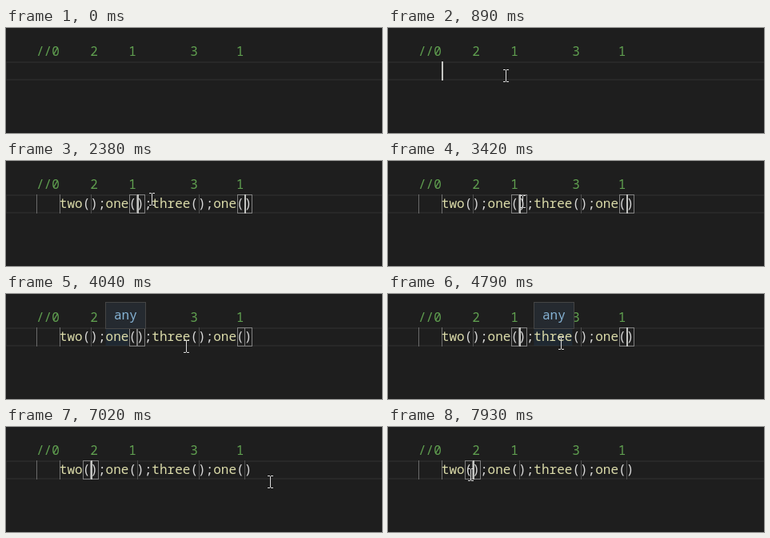
Recreate the animation shown at these times as an HTML page with a canvas. Size 470 px wide and 132 px high, loop 8 s.

```html
<!DOCTYPE html>
<html lang="en">
<head>
<meta charset="utf-8">
<title>Snippet placeholders</title>
<style>
html, body { margin: 0; width: 470px; height: 132px; overflow: hidden; background: #1e1e1e; }
canvas { display: block; width: 470px; height: 132px; }
</style>
</head>
<body>
<canvas id="stage"></canvas>
<script>
const W = 470, H = 132, LOOP = 8000;
const LEFT = 38, CHAR = 9.62, TOP = 42, ROW = 24, INDENT = 3;
const BLINK = 500, HOVER_DELAY = 480;
const FAMILY = '"Noto Sans Mono", "DejaVu Sans Mono", monospace';
const CODE = 'two();one();three();one()';
const LABELS = ['tts', 'TextTrack', 'TextTrackCue', 'TextTrackList', 'TextTrackCueList'];

// Each edit restarts the caret blink; `at` names the calls whose brackets are active
const EDITS = [
  { time: -BLINK, text: '' },
  { time: 1440, text: 't' },
  { time: 1500, text: 'tt', labels: LABELS.slice(0, 3) },
  { time: 1700, text: 'tts', labels: [LABELS[0], ...LABELS.slice(3)] },
  { time: 2380, text: CODE, at: 'one' },
  { time: 6880, text: CODE, at: 'two' }
];

// Pointer glides: start, end, target x, target y
const ENTRY = [284, 97];
const GLIDES = [
  [70, 350, 134, 64], [750, 1170, 182, 48], [3210, 3740, 141, 58], [3740, 3970, 225, 66],
  [4040, 4590, 216, 62], [4790, 5410, 371, 98], [6080, 6420, 338, 90],
  [6620, 7020, 330, 69], [7020, 7370, 160, 70], [7440, 7930, 103, 60]
];

const canvas = document.getElementById('stage');
const dpr = window.devicePixelRatio || 1;
canvas.width = W * dpr;
canvas.height = H * dpr;
const ctx = canvas.getContext('2d');
ctx.scale(dpr, dpr);

const colX = col => LEFT + col * CHAR;
const edge = col => Math.ceil(colX(col));
const ease = p => p * p * (3 - 2 * p);

function rect(x, y, w, h, color) {
  ctx.fillStyle = color;
  ctx.fillRect(x, y, w, h);
}

function frame(x, y, w, h, color) {
  ctx.strokeStyle = color;
  ctx.lineWidth = 1;
  ctx.strokeRect(x + .5, y + .5, w - 1, h - 1);
}

function text(s, x, y, color, weight = 500) {
  ctx.font = `${weight} 16.03px ${FAMILY}`;
  ctx.fillStyle = color;
  ctx.fillText(s, x, y);
}

// Columns just after each "name(" in the code
function slots(name) {
  return [...CODE.matchAll(new RegExp(`${name}\\(`, 'g'))]
    .map(m => INDENT + m.index + m[0].length);
}

function pointerAt(t) {
  let pos = ENTRY;
  for (const [a, b, ...goal] of GLIDES) {
    if (t < a) break;
    const p = ease(Math.min(1, (t - a) / (b - a)));
    pos = pos.map((v, i) => v + (goal[i] - v) * p);
  }
  return pos.map(Math.round);
}

function wordAt(line, [x, y]) {
  if (y < TOP || y > TOP + ROW) return null;
  const col = (x - LEFT) / CHAR - INDENT;
  return [...line.matchAll(/\w+/g)].find(m => col >= m.index && col < m.index + m[0].length);
}

// Matched letters, capitals first
function matches(label, query) {
  let from = 0;
  return [...query].map(ch => {
    const upper = label.indexOf(ch.toUpperCase(), from);
    const hit = upper < 0 ? label.indexOf(ch, from) : upper;
    from = hit + 1;
    return hit;
  });
}

function drawPointer([x, y]) {
  const c = '#dcdcdc';
  rect(x, y - 7, 1, 14, c);
  for (const e of [y - 8, y + 7]) {
    rect(x - 3, e, 3, 1, c);
    rect(x + 1, e, 3, 1, c);
  }
}

function drawLine() {
  for (const y of [TOP, TOP + ROW - 2]) rect(0, y, W, 2, '#282828');
  rect(0, TOP, 1, ROW, '#282828');
}

function drawCode(active) {
  for (const col of slots('\\w+')) rect(edge(col), TOP, 1, ROW, '#505050');
  rect(edge(INDENT), TOP, 1, ROW, '#707070');
  for (const { 0: part, index } of CODE.matchAll(/\w+|\W+/g)) {
    text(part, colX(INDENT + index), 59, /\w/.test(part) ? '#dcdcaa' : '#d8d8d8');
  }
  for (const col of active) {
    for (const c of [col - 1, col]) frame(edge(c), TOP, 10, ROW, '#808080');
  }
}

function drawIcon(row, y) {
  if (row === 0) {
    ctx.setLineDash([2, 1]);
    frame(93, y + 5, 15, 15, '#e4e4e4');
    ctx.setLineDash([]);
    return;
  }
  for (const [x, tip] of [[91, 91], [108, 106]]) {
    rect(x, y + 6, 1, 12, '#c5c5c5');
    for (const dy of [6, 17]) rect(tip, y + dy, 3, 1, '#c5c5c5');
  }
  // A slanted box
  ctx.save();
  ctx.transform(1, -.4, 0, 1, 96, y + 12);
  frame(0, 0, 9, 5, '#75beff');
  rect(4, 0, 1, 5, '#75beff');
  ctx.restore();
}

function drawList(labels, query) {
  const x = 86, y0 = TOP + ROW;
  rect(x, y0, W, H, '#252526');
  frame(x, y0, W, H, '#454545');
  rect(x + 1, y0 + 1, W, ROW, '#094771');
  labels.forEach((label, row) => {
    const y = y0 + 1 + row * ROW, hits = matches(label, query);
    drawIcon(row, y);
    [...label].forEach((ch, i) => {
      const hit = hits.includes(i);
      text(ch, 115 + i * CHAR, y + 17, hit ? '#18a3ff' : '#d4d4d4', hit ? 700 : 500);
    });
  });
}

function drawHint(col) {
  const x = Math.floor(colX(col));
  rect(x, 10, 51, 34, '#252a30');
  frame(x, 10, 51, 34, '#454545');
  text('any', x + 11, 32, '#86b4d6');
}

function draw(t) {
  const edit = EDITS.filter(e => t >= e.time).pop();
  const line = edit.text;
  const active = edit.at ? slots(edit.at) : [];
  const word = wordAt(line, pointerAt(t - HOVER_DELAY));

  rect(0, 0, W, H, '#1e1e1e');
  drawLine();
  text('//0    2    1       3     1', LEFT, 35, '#60a050');
  if (line) rect(LEFT, TOP, 1, ROW, '#6a6a6a');
  if (word) {
    rect(colX(INDENT + word.index), TOP + 1, word[0].length * CHAR, ROW - 2, 'rgba(38,79,120,.22)');
  }

  if (edit.at) drawCode(active);
  else text(line, colX(INDENT), 59, '#9cdcfe');
  if (edit.labels) drawList(edit.labels, line);
  if (word) drawHint(INDENT + word.index);

  if (Math.floor((t - edit.time) / BLINK) % 2 === 0) {
    const carets = edit.at ? active : [INDENT + line.length];
    for (const col of carets) rect(edge(col), TOP, 2, ROW, '#c4c5c2');
  }
  if (t >= GLIDES[0][0]) drawPointer(pointerAt(t));
}

const start = performance.now();
function tick() {
  draw((performance.now() - start) % LOOP);
  requestAnimationFrame(tick);
}
tick();
</script>
</body>
</html>
```
